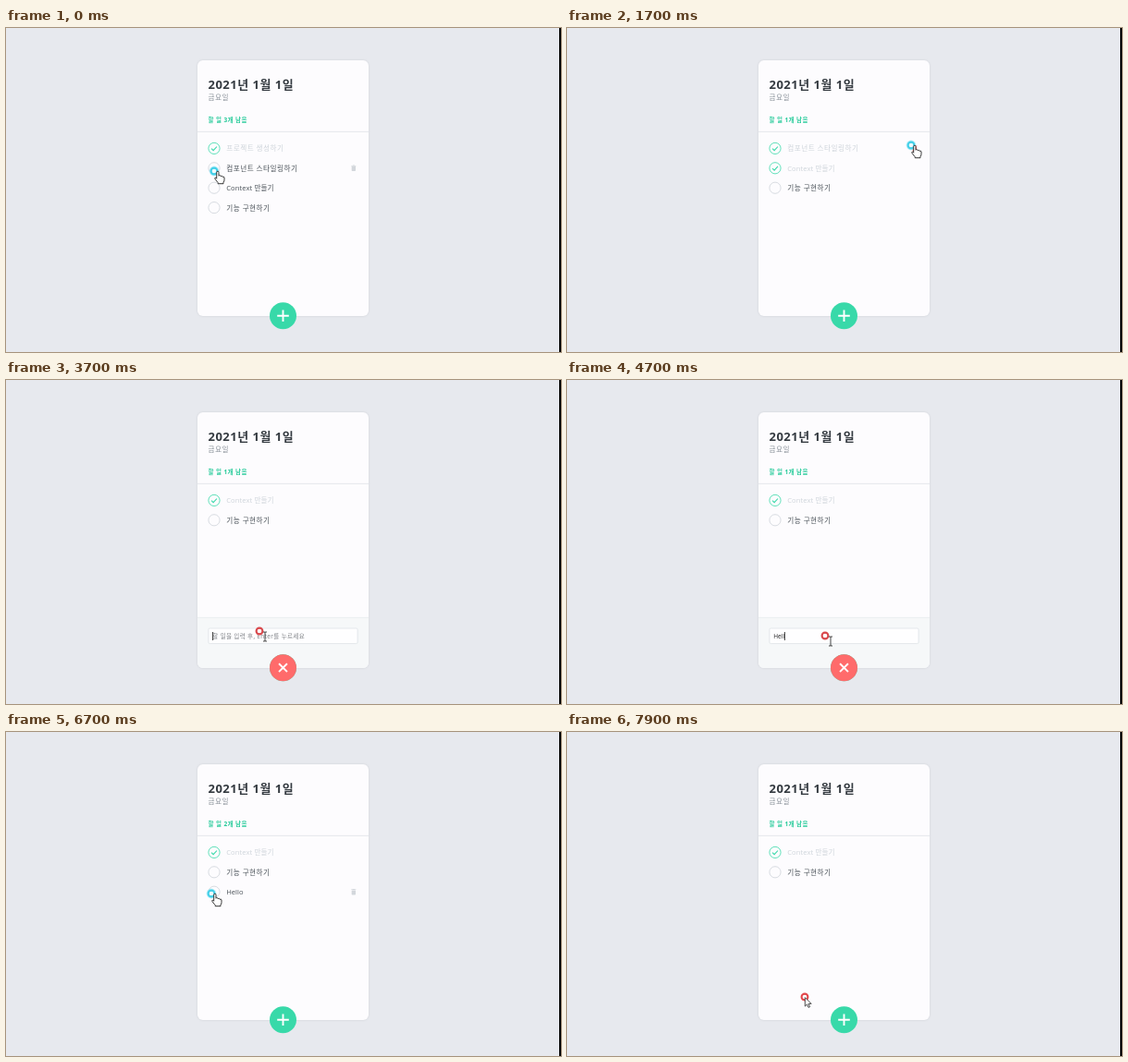
Recreate the animation shown at these times as an HTML page. Size 600 by 351 pixels, loop 8 s.

```html
<!DOCTYPE html>
<html lang="ko">
<head>
<meta charset="utf-8">
<title>할 일 목록</title>
<style>
  html, body { margin: 0; width: 100%; height: 100%; overflow: hidden; background: #e7e9ee; }
  svg { display: block; width: 600px; height: 351px; }
  text { font-family: "Open Sans", "Noto Sans CJK KR", "Noto Sans CJK", sans-serif; white-space: pre; }
  .bold { font-weight: 700; }
</style>
</head>
<body>
<svg viewBox="0 0 600 351">
  <defs>
    <filter id="shadow" x="-10%" y="-10%" width="120%" height="120%">
      <feGaussianBlur stdDeviation="1.6"/>
    </filter>
    <clipPath id="cardClip"><rect x="207" y="35" width="185" height="277" rx="5.8"/></clipPath>
  </defs>
  <rect width="600" height="351" fill="#e7e9ee"/>
  <rect x="598" width="2" height="351" fill="#000"/>
  <rect x="207" y="35" width="185" height="277" rx="5.8" opacity=".09" filter="url(#shadow)"/>
  <rect x="207" y="35" width="185" height="277" rx="5.8" fill="#fdfcfe"/>
  <text class="bold" x="218.5" y="65.8" font-size="13" letter-spacing=".5" fill="#343a40">2021년 1월 1일</text>
  <text x="218.5" y="78.4" font-size="7.6" letter-spacing=".5" fill="#868e96">금요일</text>
  <text id="count" class="bold" x="218.5" y="101.8" font-size="6.5" letter-spacing=".4" fill="#20c997"></text>
  <path d="M207 112.4H392" stroke="#e4e6ea" stroke-width=".9"/>
  <g id="list"></g>
  <g id="form">
    <g clip-path="url(#cardClip)">
      <rect x="207" y="257" width="185" height="55" fill="#f6f8f9"/>
      <path d="M207 257.4H392" stroke="#e9ecef" stroke-width=".8"/>
    </g>
    <rect x="218.9" y="269" width="161.2" height="16.6" rx="1.5" fill="#fefeff" stroke="#dee2e6" stroke-width=".8"/>
    <text id="entry" x="223.3" y="279.8" font-size="6.5"></text>
    <path id="caret" d="M0 273V282" stroke="#222" stroke-width=".9"/>
  </g>
  <g transform="translate(299.5 311.7)">
    <circle id="green" r="14.5"/>
    <circle id="red" r="14.5"/>
    <path id="plus" d="M-6.3 0H6.3M0-6.3V6.3" stroke="#fff" stroke-width="1.9"/>
  </g>
  <g id="pointer"></g>
</svg>
<script>
const LOOP = 8000, STEP = 100;
const OPEN = 3400, SUBMIT = 5100;
const ROW_TOP = 130.4, ROW_GAP = 21.4;

const todos = [
  { text: '프로젝트 생성하기', done: 0, removed: 1600 },
  { text: '컴포넌트 스타일링하기', done: 200, removed: 2000 },
  { text: 'Context 만들기', done: 600, spacing: .1 },
  { text: '기능 구현하기' },
  { text: 'Hello', added: SUBMIT, done: 6800, removed: 7500, spacing: 0 },
];
const keyTimes = [4300, 4400, 4500, 4700, 4800];

// time, x, y of the pointer
const path = [
  [0, 225, 155], [200, 225, 155], [500, 222, 174], [700, 222, 174], [900, 240, 172],
  [1300, 372, 127], [2300, 372, 127], [2400, 368, 134], [2700, 290, 156], [2800, 262, 173],
  [3100, 290, 295], [3200, 298, 309], [3400, 298, 309], [3700, 274, 272], [4000, 279, 277],
  [5900, 279, 277], [6600, 223, 176], [6700, 222, 175], [6900, 222, 175], [7300, 371, 170],
  [7500, 371, 170], [7700, 346, 203], [7900, 257, 287], [8000, 257, 287],
];

const $ = id => document.getElementById(id);
const clamp = v => Math.max(0, Math.min(1, v));

function pointerAt(t) {
  const i = path.findIndex(p => p[0] > t);
  const [t0, x0, y0] = path[i - 1], [t1, x1, y1] = path[i];
  const k = (t - t0) / (t1 - t0);
  const e = t1 - t0 > 300 ? k * k * (3 - 2 * k) : k;
  return { x: x0 + (x1 - x0) * e, y: y0 + (y1 - y0) * e };
}

const rowAt = p => p.x > 215 && p.x < 382 ? Math.round((p.y - ROW_TOP) / ROW_GAP) : -1;
const overButton = p => Math.hypot(p.x - 299.5, p.y - 311.7) < 14.5;

function todoRow(todo, i, t, hover, hot) {
  const y = ROW_TOP + i * ROW_GAP, done = t >= todo.done;
  const check = done ? '<path d="M-2.9.3L-.9 2.3 3-1.9" fill="none" stroke="#38d9a9" stroke-width="1.1"/>' : '';
  const trash = hover ? `<path transform="translate(146.5 -4.3) scale(.36)" fill="${hot ? '#ff6b6b' : '#d3d7dc'}"
    d="M6 7H18V19Q18 21 16 21H8Q6 21 6 19ZM5 4H8.5L9.5 3H14.5L15.5 4H19V6H5Z"/>` : '';
  return `<g transform="translate(225 ${y})">
    <circle r="6.1" fill="none" stroke="${done ? '#38d9a9' : '#ced4da'}" stroke-width=".8"/>${check}
    <text x="13.2" y="2.9" font-size="7.6" letter-spacing="${todo.spacing ?? .5}"
      fill="${done ? '#ced4da' : '#495057'}">${todo.text}</text>${trash}</g>`;
}

function pointerKind(p, t, rows, open) {
  const row = rowAt(p);
  if (overButton(p)) return 'hand';
  if (row >= 0 && row < rows && (p.x < 232 || p.x > 367)) return 'hand';
  if (open && p.x > 219 && p.x < 380 && p.y > 269 && p.y < 286) return 'beam';
  return t >= 2600 && t <= 2900 ? 'busy' : 'arrow';
}

const ring = (color, x = 0, y = 0) =>
  `<circle cx="${x}" cy="${y}" r="3.4" fill="#fff" fill-opacity=".75" stroke="${color}" stroke-width="2.1"/>`;
const glow = '<circle r="5.4" fill="#8be6f5" opacity=".55"/>' + ring('#43cfe8');
const arrow = y => `<path transform="translate(.3 ${y})" fill="#fff" stroke="#222" stroke-width=".8"
  d="M0 0V9.5L2.2 7.4 3.7 10.8 5.3 10.1 3.8 6.8H6.8Z"/>`;
const shapes = {
  arrow: ring('#e2474b') + arrow(.6),
  busy: ring('#e9484d') + ring('#2496d2', 8.2, 5) + arrow(5),
  beam: ring('#d9484c') + `<path transform="translate(6 6)" fill="none" stroke="#333" stroke-width=".9"
    d="M-2-5H-.5Q0-5 0-4V4Q0 5-.5 5H-2M2-5H.5Q0-5 0-4M0 4Q0 5 .5 5H2"/>`,
  hand: glow + `<path transform="translate(4 .2)" fill="#fff" stroke="#222" stroke-width=".9"
    d="M-1.3 8V1.2Q-1.3 0-.1 0T1 1.2V5Q1.4 4.2 2.3 4.5T3.2 5.4Q4 4.7 4.7 5.2T5.3 6.2Q6.3 5.6 7 6.5V9.5Q7 11 6 12V13.5H.2V12.4Q-1 11-3 8.4Q-3.6 7.2-2.8 7T-1.3 8Z"/>`,
};

function drawForm(t, open) {
  $('form').setAttribute('visibility', open ? 'visible' : 'hidden');
  const typed = keyTimes.filter(k => t >= k).length;
  const entry = $('entry');
  entry.textContent = typed ? 'Hello'.slice(0, typed) : '할 일을 입력 후, Enter를 누르세요';
  entry.setAttribute('fill', typed ? '#222' : '#7c7f83');
  entry.setAttribute('letter-spacing', typed ? 0 : .35);
  const x = 223.6 + (typed ? entry.getComputedTextLength() : 0);
  const blinkOn = typed || Math.floor((t - OPEN) / 500) % 2 === 0;
  $('caret').setAttribute('transform', `translate(${x} 0)`);
  $('caret').setAttribute('opacity', blinkOn ? 1 : 0);
}

function drawButton(t, hover) {
  const raw = t < SUBMIT ? clamp((t - OPEN + 50) / 125) : 1 - clamp((t - SUBMIT + 50) / 125);
  const turn = raw * raw;
  $('green').setAttribute('fill', hover ? '#63e6be' : '#38d9a9');
  $('red').setAttribute('fill', hover ? '#ff8787' : '#ff6b6b');
  $('red').setAttribute('opacity', turn);
  $('plus').setAttribute('transform', `rotate(${45 * turn})`);
}

function draw(t) {
  const p = pointerAt(t), last = pointerAt(Math.max(0, t - STEP));
  const open = t >= OPEN && t < SUBMIT;
  const visible = todos.filter(d => t >= (d.added ?? 0) && t < (d.removed ?? LOOP));
  const hoverRow = rowAt(last);
  $('count').textContent = `할 일 ${visible.filter(d => !(t >= d.done)).length}개 남음`;
  $('list').innerHTML = visible.map((d, i) => todoRow(d, i, t, i === hoverRow, last.x > 367)).join('');
  drawForm(t, open);
  drawButton(t, overButton(p));
  $('pointer').setAttribute('transform', `translate(${p.x} ${p.y})`);
  $('pointer').innerHTML = shapes[pointerKind(p, t, visible.length, open)];
}

const start = performance.now();
let shown = -1;
function tick() {
  const elapsed = (performance.now() - start) % LOOP;
  const t = Math.floor(elapsed / STEP) * STEP;
  if (t !== shown) draw(shown = t);
  requestAnimationFrame(tick);
}
tick();
</script>
</body>
</html>
```
